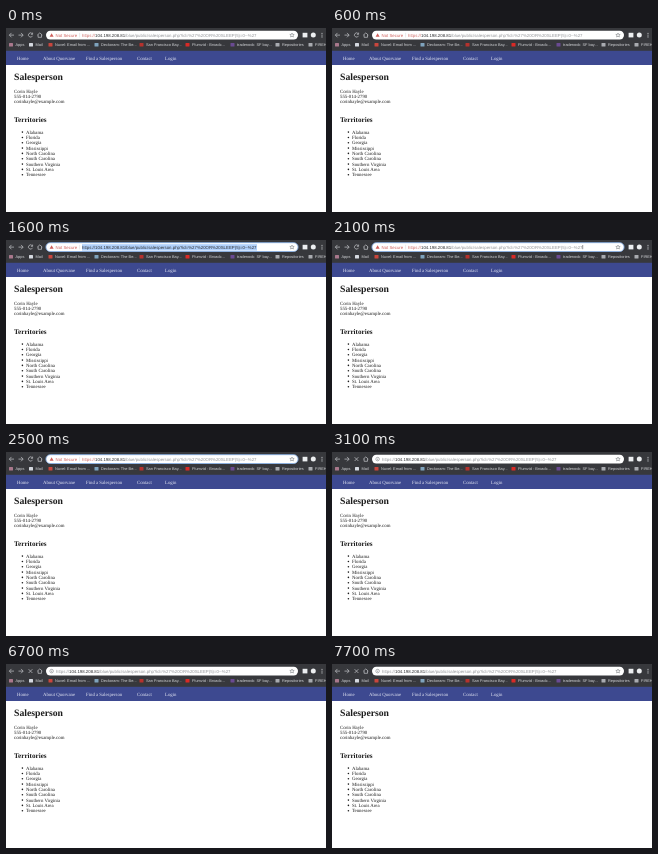
Animation of 320x184 px, one loop 8000 ms. Source, as an HTML page:

```html
<!DOCTYPE html>
<html lang="en">
<head>
<meta charset="utf-8">
<title>Salesperson</title>
<style>
html, body { margin: 0; width: 100%; height: 100%; overflow: hidden; background: #fff; }
svg { display: block; width: 100vw; height: 100vh; text-rendering: geometricPrecision; }
.ui { font-family: "Liberation Sans", Arial, sans-serif; }
.page { font: 4.8px "Liberation Serif", "Times New Roman", serif; fill: #1c1c1c; }
.line { fill: none; stroke: #c4c6ca; stroke-width: .7; }
.dark { stroke: #6b6e73; stroke-width: .5; }
#url { font-size: 4.33px; fill: #929498; }
#host { fill: #2c2d30; }
#url.selected, .selected tspan { fill: #2c2d30 !important; }
</style>
</head>
<body>
<svg viewBox="0 0 320 184" preserveAspectRatio="none">
  <rect width="320" height="184" fill="#fff"/>
  <g class="ui">
    <rect width="320" height="23" fill="#37383c"/>
    <g transform="translate(0 -.4)">
      <rect x="40" y="3.2" width="252" height="8.6" rx="4.3" fill="#fff"/>
      <rect id="focus" x="39.9" y="3.1" width="252.2" height="8.8" rx="4.4" fill="none" stroke="#8ab4ee" stroke-width=".8"/>
      <path class="line" d="M8 7.5H3.5M5.5 5.3 3.3 7.5 5.5 9.7M12.5 7.5H17M15 5.3 17.2 7.5 15 9.7"/>
      <path class="line" id="reload" d="M26.3 6.2A2.1 2.1 0 1 0 26.5 8.2M26.6 5V6.7H24.9"/>
      <path class="line" id="stop" d="M22.6 5.6 26.4 9.4M26.4 5.6 22.6 9.4"/>
      <path class="line" d="M31.3 7.5 33.8 5.3 36.3 7.5M32.1 7V9.7H35.5V7"/>
      <g id="warning" fill="#cf5f5b">
        <path d="M45.6 5.6 47.6 9.2H43.6Z"/>
        <text x="49.6" y="9.2" font-size="4.3">Not Secure</text>
        <path d="M73.6 5.2V9.8" stroke="#c9cbcf" stroke-width=".4"/>
      </g>
      <g id="info">
        <circle class="line dark" cx="45.6" cy="7.5" r="1.8"/>
        <path class="line dark" d="M45.6 7.2V8.6M45.6 6.2V6.6"/>
      </g>
      <rect id="selection" x="76" y="4.6" width="175" height="6.4" fill="#b0d0fb"/>
      <text id="url" y="9.2"><tspan id="scheme">https://</tspan><tspan id="host">104.198.208.81</tspan>/blue/public/salesperson.php?id=%27%20OR%20SLEEP(5)=0--%27</text>
      <rect id="caret" x="250.6" y="5.4" width=".5" height="4.2" fill="#2c2d30"/>
      <path class="line dark" d="M286 5.4 286.6 6.8 288.2 6.9 287 7.9 287.4 9.4 286 8.6 284.6 9.4 285 7.9 283.8 6.9 285.4 6.8Z"/>
      <rect x="296.6" y="5.2" width="4.8" height="4.6" fill="#eceef0"/>
      <circle cx="307.3" cy="7.5" r="2.5" fill="#eceef0"/>
      <g fill="#c4c6ca"><circle cx="316" cy="5.7" r=".6"/><circle cx="316" cy="7.5" r=".6"/><circle cx="316" cy="9.3" r=".6"/></g>
    </g>
    <g id="bookmarks" font-size="3.9" fill="#d5d7da"></g>
  </g>
  <g class="page">
    <rect y="22.8" width="320" height="14.2" fill="#3d4990"/>
    <g id="menu" fill="#e4e7f4"></g>
    <text x="8" y="51.7" font-size="9.7" font-weight="bold">Salesperson</text>
    <text x="8" y="64.6">Corin Hayle</text>
    <text x="8" y="70">555-014-2790</text>
    <text x="8" y="75.3">corinhayle@example.com</text>
    <text x="8" y="94.3" font-size="7.15" font-weight="bold">Territories</text>
    <g id="territories"></g>
  </g>
</svg>
<script>
const $ = id => document.getElementById(id);
const label = (x, y, text) => `<text x="${x}" y="${y}">${text}</text>`;
const show = (id, on) => $(id).setAttribute("visibility", on ? "visible" : "hidden");

const bookmarks = [
  [9.5, "Apps", "#a9788c"], [29.5, "Mail", "#d5d9e0"],
  [49, "Nuvel: Email from ...", "#c9463d"],
  [95, "Deckoram: The Be...", "#7fa3bd"],
  [140, "San Francisco Bay...", "#b5322d"],
  [186, "Plumvid - Broadc...", "#d92a26"],
  [231, "tradenook: SF bay...", "#6a4a92"],
  [276, "Repositories", "#a9abb0"], [309, "FIREHOSE", "#a9abb0"]
];
$("bookmarks").innerHTML = bookmarks.map(([x, text, color]) =>
  `<rect x="${x - 6.5}" y="14.9" width="4" height="3.6" rx=".5" fill="${color}"/>` + label(x, 18, text)).join("");

$("menu").innerHTML = [
  [11, "Home"], [37, "About Quorvane"], [80, "Find a Salesperson"], [131, "Contact"], [159, "Login"]
].map(([x, text]) => label(x, 31.5, text)).join("");

$("territories").innerHTML = [
  "Alabama", "Florida", "Georgia", "Mississippi", "North Carolina",
  "South Carolina", "Southern Virginia", "St. Louis Area", "Tennessee"
].map((name, i) => {
  const y = 105.6 + i * 5.33;
  return `<circle cx="16.4" cy="${y - 1.5}" r=".8"/>` + label(20, y, name);
}).join("");

function draw(now) {
  const t = now % 8000;
  const loading = t >= 3100;
  const selected = t >= 1500 && t < 2100;
  show("focus", t >= 1500 && !loading);
  show("reload", !loading);
  show("stop", loading);
  show("warning", !loading);
  show("info", loading);
  show("selection", selected);
  show("caret", t >= 2100 && t < 2500);
  $("url").setAttribute("x", loading ? 50 : 76);
  $("url").setAttribute("class", selected ? "selected" : "");
  $("scheme").setAttribute("fill", loading ? "#929498" : "#cf6a66");
  requestAnimationFrame(draw);
}
draw(performance.now());
</script>
</body>
</html>
```
